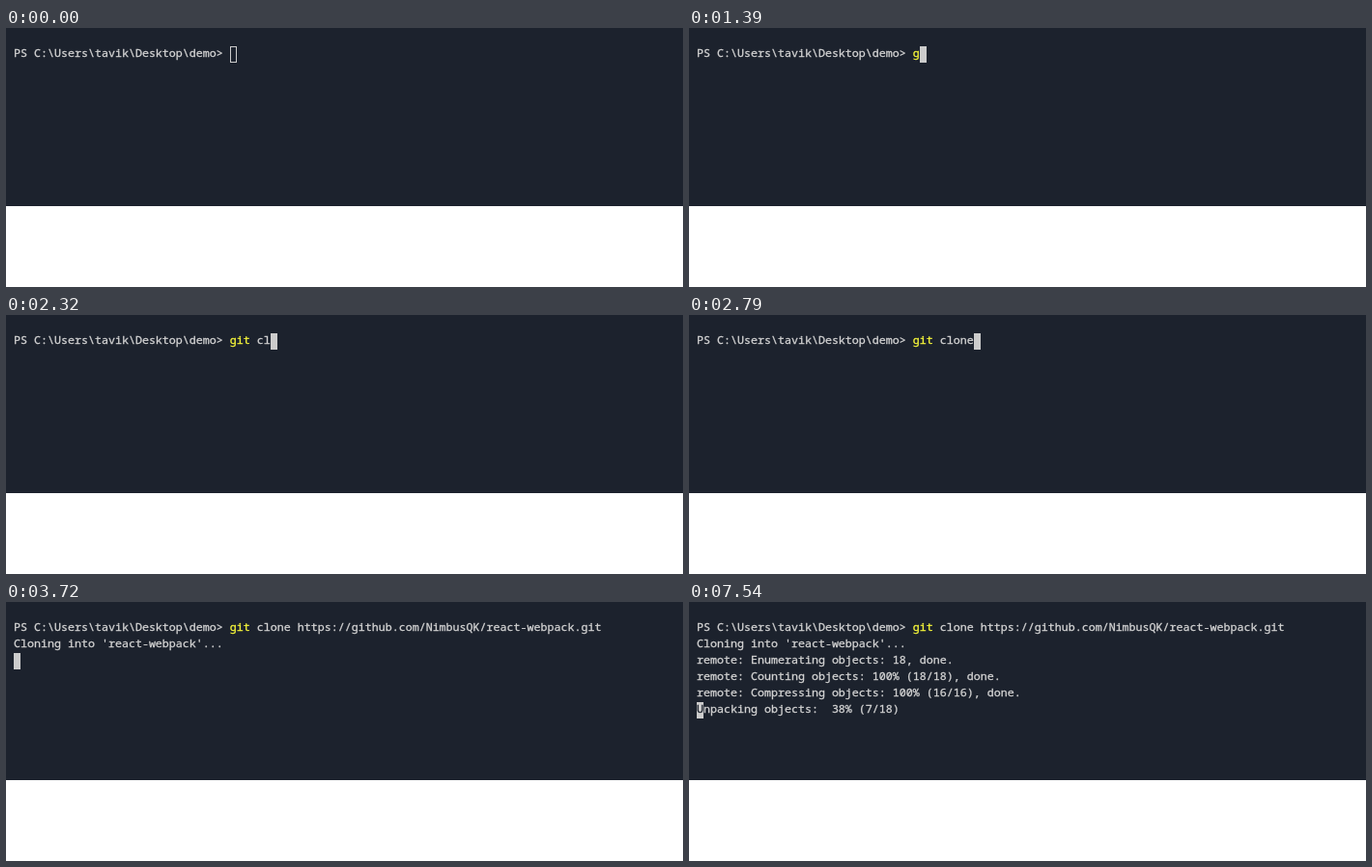
Recreate the animation shown at these times as an HTML page. Size 701 by 269 pixels, loop 8 s.

```html
<!DOCTYPE html>
<html lang="en">
<head>
<meta charset="utf-8">
<title>Cloning a repository</title>
<style>
  html, body { margin: 0; width: 100%; height: 100%; overflow: hidden; background: #fff; }
  #term {
    position: absolute; left: 0; top: 0; width: 701px; height: 185px;
    overflow: hidden; background: #1c222d; color: #d4d4d4;
    font: 11.6667px/17px "Noto Sans Mono", "DejaVu Sans Mono", monospace;
    font-variant-ligatures: none;
    -webkit-text-stroke: 0.3px currentColor;
  }
  #text { position: absolute; left: 8px; top: 17px; margin: 0; font: inherit; white-space: pre; }
  #name { color: #f9f93a; }
  #cursor {
    position: absolute; box-sizing: border-box; width: 7px; height: 17px;
    line-height: 13px; background: #ccc; color: #1c222d;
  }
  #cursor.hollow { background: none; border: 1px solid #ccc; }
</style>
</head>
<body>
<div id="term">
  <pre id="text">PS C:\Users\tavik\Desktop\demo&gt; <span id="name"></span><span id="args"></span><span id="output"></span></pre>
  <div id="cursor" class="hollow"></div>
</div>
<script>
const LOOP = 8000, CELL = 7, ROW = 17, PROMPT = 32;
const $ = id => document.getElementById(id);
const [nameEl, argsEl, outputEl, cursor] = ["name", "args", "output", "cursor"].map($);

const command = "git clone https://github.com/NimbusQK/react-webpack.git";

// Times at which 1, 2, 3... characters are typed; the address is pasted last.
const keys = [1390, 1540, 1620, 1940, 2090, 2320, 2470, 2640, 2790, 3020];
const PASTE = 3270, FOCUS = 460;

const cloning = "\nCloning into 'react-webpack'...";
const remote = cloning +
  "\nremote: Enumerating objects: 18, done." +
  "\nremote: Counting objects: 100% (18/18), done." +
  "\nremote: Compressing objects: 100% (16/16), done.";
const unpack = n =>
  `${remote}\nUnpacking objects: ${String(Math.floor(n * 100 / 18)).padStart(3)}% (${n}/18)`;

// Output by time, with the row of the cursor.
const outputs = [
  [3650, "", 1],
  [3720, cloning, 2],
  [7390, remote, 5],
  [7470, unpack(4), 5],
  [7540, unpack(7), 5],
];

function draw(t) {
  const typed = t >= PASTE ? command.length : keys.filter(k => k <= t).length;
  const [, output, row] = outputs.filter(o => o[0] <= t).pop() || [0, "", 0];
  const col = row ? 0 : PROMPT + typed;

  nameEl.textContent = command.slice(0, Math.min(typed, 3));
  argsEl.textContent = command.slice(3, Math.max(typed, 3));
  outputEl.textContent = output;

  cursor.className = t < FOCUS ? "hollow" : "";
  cursor.style.left = 8 + col * CELL + "px";
  cursor.style.top = 19 + row * ROW + "px";
  cursor.textContent = row ? (output.split("\n")[row] || "").charAt(0) : "";
}

const start = performance.now();
function tick() {
  draw((performance.now() - start) % LOOP);
  requestAnimationFrame(tick);
}
tick();
</script>
</body>
</html>
```
